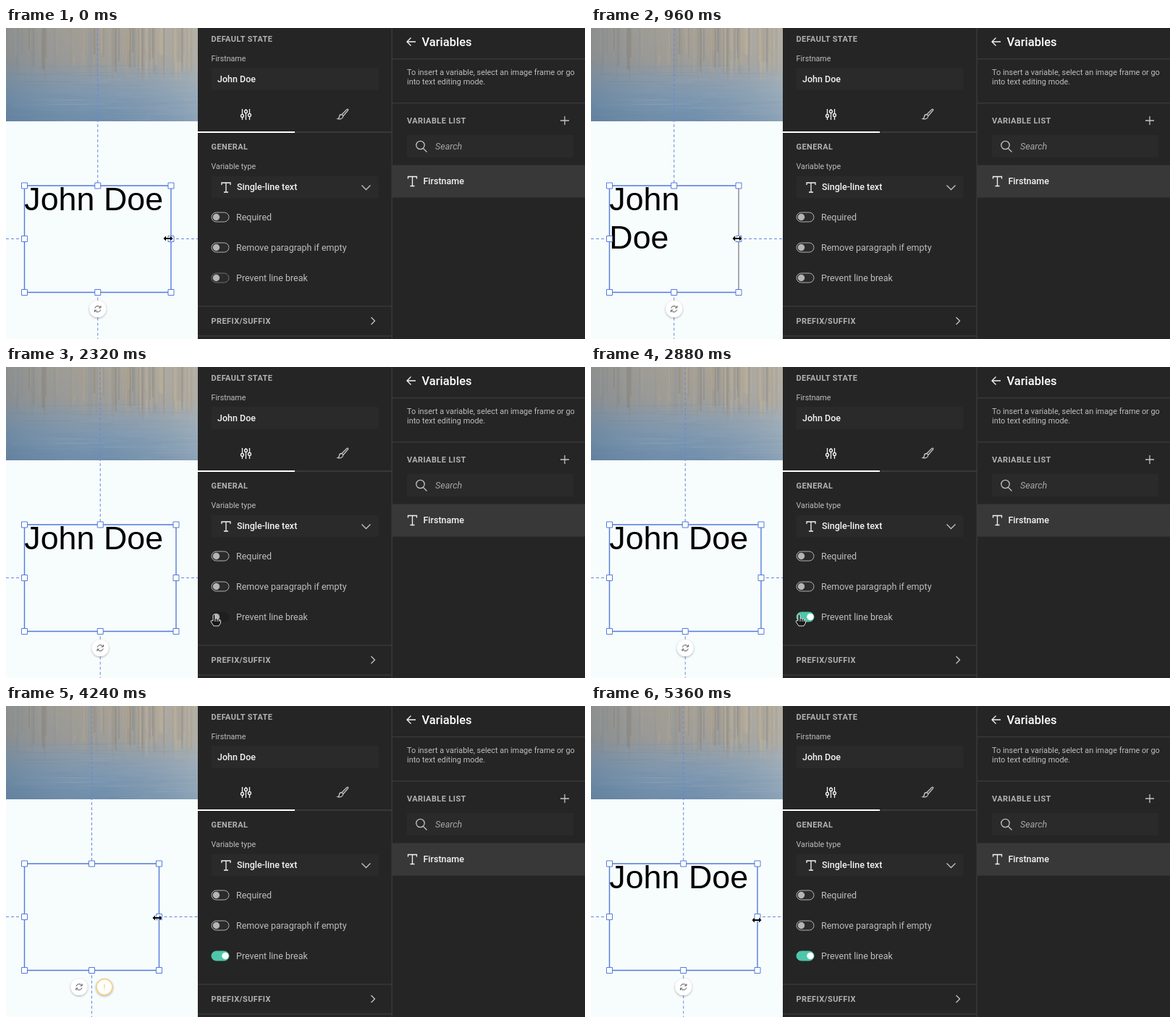
Animation, 800 px wide and 430 px high, one loop 5440 ms. Source, as an HTML page:

```html
<!DOCTYPE html>
<html lang="en">
<head>
<meta charset="utf-8">
<style>
  html, body { margin: 0; width: 100%; height: 100%; overflow: hidden; background: #f7fdfd; }
  svg { display: block; }
  text { font: 400 12.5px Roboto, sans-serif; fill: #bdbdbd; white-space: pre; }
  .head { font-weight: 700; font-size: 11px; letter-spacing: .4px; fill: #b2b2b2; }
  .label { font-size: 10.7px; }
  .note { font-size: 10.9px; }
  .search { font-style: italic; fill: #a6a6a6; }
  .value { font-weight: 500; fill: #f4f4f4; }
  .title { font-weight: 500; font-size: 16.5px; fill: #fff; }
  .doc { font: 44.8px "Liberation Sans", Arial, sans-serif; fill: #000; }
  .icon { fill: none; stroke: #c4c4c4; stroke-width: 1.3; }
  .white { stroke: #f4f4f4; }
  .guide { fill: none; stroke: #6a87da; stroke-dasharray: 4 3; }
  .field { fill: #2a2a2a; }
  .rule { fill: #383838; }
</style>
</head>
<body>
<svg width="800" height="430" viewBox="0 0 800 430">
  <defs>
    <linearGradient id="water" x2="0" y2="1">
      <stop offset="0" stop-color="#a8a195"/>
      <stop offset=".35" stop-color="#a09d97"/>
      <stop offset=".55" stop-color="#8c9cab"/>
      <stop offset=".75" stop-color="#7b97b1"/>
      <stop offset="1" stop-color="#6c8cac"/>
    </linearGradient>
    <linearGradient id="light">
      <stop offset="0" stop-color="#4d6880" stop-opacity=".3"/>
      <stop offset=".5" stop-color="#8e9aa5" stop-opacity=".08"/>
      <stop offset="1" stop-color="#d3d3cc" stop-opacity=".32"/>
    </linearGradient>
    <linearGradient id="fade" x2="0" y2="1">
      <stop offset="0" stop-color="#fff"/>
      <stop offset=".65" stop-color="#fff"/>
      <stop offset="1" stop-color="#000"/>
    </linearGradient>
    <mask id="melt"><rect width="265" height="78" fill="url(#fade)"/></mask>
    <filter id="shadow" x="-50%" y="-50%" width="200%" height="200%">
      <feDropShadow dx="0" dy="1" stdDeviation="1.5" flood-opacity=".35"/>
    </filter>
    <g id="toggle">
      <rect x="284" y="-6.5" width="24" height="13" rx="6.5" fill="#2b2b2b" stroke="#b0b0b0"/>
      <circle cx="290.5" r="4.7" fill="#b4b4b4"/>
    </g>
    <path id="tee" class="icon white" d="M-6-3.5V-6.5H6V-3.5M0-6.5V6.5M-3 6.5H3"/>
  </defs>

  <rect width="265" height="129" fill="url(#water)"/>
  <g id="streaks" mask="url(#melt)"></g>
  <g id="ripples"></g>
  <rect width="265" height="129" fill="url(#light)"/>

  <path id="guides" class="guide"/>
  <text id="line1" class="doc" x="25.3" y="251.7"></text>
  <text id="line2" class="doc" x="25.3" y="305.2"></text>
  <path id="frame" fill="none" stroke="#527add" stroke-width="1.4"/>
  <path id="edge" fill="none" stroke-width="1.4"/>
  <path id="handles" fill="#fff" stroke="#527add"/>
  <g id="refresh">
    <circle r="11.5" fill="#fff" filter="url(#shadow)"/>
    <path d="M-4-1A4.2 4.2 0 0 1 3.5-2.4M4.2-4.5V-1.6H1.4M4 1A4.2 4.2 0 0 1-3.5 2.4M-4.2 4.5V1.6H-1.4" fill="none" stroke="#555"/>
  </g>
  <g id="warning">
    <circle r="11" fill="#fff" stroke="#f3cd80" stroke-width="1.4" filter="url(#shadow)"/>
    <path d="M0-4V1.5M0 3V4.2" stroke="#f3cd80" stroke-width="1.2"/>
  </g>

  <rect x="265" width="535" height="430" fill="#252525"/>
  <rect class="rule" x="532.5" width="1.5" height="430"/>
  <rect class="rule" x="265" y="143" width="268" height="2"/>
  <rect x="265" y="143" width="134" height="2" fill="#fff"/>
  <rect class="rule" x="265" y="384" width="268" height="1.5"/>
  <rect class="rule" x="265" y="425" width="268" height="1.5"/>
  <rect class="rule" x="534" y="42" width="266" height="1.5"/>
  <rect class="rule" x="534" y="103" width="266" height="1.5"/>

  <text class="head" x="283.5" y="19">DEFAULT STATE</text>
  <text class="label" x="283.5" y="46">Firstname</text>
  <rect class="field" x="283.5" y="55" width="231" height="31" rx="2"/>
  <text class="value" x="292" y="75">John Doe</text>
  <g class="icon white">
    <path d="M326.5 112V119M326.5 124V127M331.5 112V113M331.5 118V127M336.5 112V118M336.5 123V127"/>
    <circle cx="326.5" cy="121.5" r="2"/>
    <circle cx="331.5" cy="115.5" r="2"/>
    <circle cx="336.5" cy="120.5" r="2"/>
  </g>
  <path class="icon" d="M464 119.5L471 112.5Q473.5 111.5 472.5 114L466 121.5ZM464 119.5Q460.5 119.5 460.5 123Q460 125 458.5 125.5Q465 127 466 121.5"/>

  <text class="head" x="283.5" y="168">GENERAL</text>
  <text class="label" x="283.5" y="195">Variable type</text>
  <rect class="field" x="283.5" y="205" width="231" height="30" rx="2"/>
  <use href="#tee" x="304" y="220.5"/>
  <text class="value" x="319" y="224">Single-line text</text>
  <path class="icon" d="M491.5 217.5L497.5 223.5L503.5 217.5"/>
  <use href="#toggle" y="261.5"/>
  <text x="318" y="266">Required</text>
  <use href="#toggle" y="303.5"/>
  <text x="318" y="308">Remove paragraph if empty</text>
  <rect id="track" x="284" y="339" width="24" height="13" rx="6.5"/>
  <circle id="knob" cy="345.5" r="4.7"/>
  <text x="318" y="350">Prevent line break</text>
  <text class="head" x="283.5" y="409">PREFIX/SUFFIX</text>
  <path class="icon" d="M504.5 400L509.5 405L504.5 410"/>

  <path class="icon white" d="M566 19H554M559.5 13.5L554 19L559.5 24.5"/>
  <text class="title" x="574.5" y="25">Variables</text>
  <text class="note" x="554" y="65">To insert a variable, select an image frame or go</text>
  <text class="note" x="554" y="78">into text editing mode.</text>
  <text class="head" x="554" y="132">VARIABLE LIST</text>
  <path class="icon" d="M766 128H778M772 122V134"/>
  <rect class="field" x="554" y="148" width="230" height="31" rx="2"/>
  <path class="icon" d="M576.5 166.5L581.5 171.5"/>
  <circle class="icon" cx="572.5" cy="162" r="5.7"/>
  <text class="search" x="593" y="168">Search</text>
  <rect x="534" y="189.5" width="266" height="45" fill="#383838"/>
  <use href="#tee" x="561.5" y="212"/>
  <text class="value" x="576.5" y="216">Firstname</text>

  <path id="cursor"/>
</svg>
<script>
const $ = id => document.getElementById(id);
const set = (id, attrs) => {
  for (const k in attrs) $(id).setAttribute(k, attrs[k]);
};

// Reflection: vertical streaks above, fine ripples below
let seed = 7;
const rnd = () => (seed = seed * 16807 % 2147483647) / 2147483647;
const tones = ['#c0a780', '#77797a', '#b8ab96', '#8d9499', '#c8b28f', '#8f8473'];
let svg = '';
for (let i = 0; i < 110; i++) {
  svg += `<rect x="${rnd() * 264}" width="${1 + rnd() * 3}" height="${30 + rnd() * 48}"
    fill="${tones[i % 6]}" opacity="${.15 + rnd() * .35}"/>`;
}
$('streaks').innerHTML = svg;
svg = '';
for (let i = 0; i < 80; i++) {
  const x = rnd() * 240, y = 50 + rnd() * 78;
  svg += `<rect x="${x}" y="${y}" width="${Math.min(265 - x, 20 + rnd() * 80)}" height="1"
    fill="${i % 2 ? '#a9b9cb' : '#5f7f9f'}" opacity=".14"/>`;
}
$('ripples').innerHTML = svg;

// time, right edge of the text frame, cursor x, cursor y
const keys = [
  [0, 228, 224, 291], [640, 216, 213, 291], [960, 204, 202, 291], [1120, 199, 197, 292],
  [1440, 229, 227, 293], [1760, 235, 233, 293], [1920, 235, 233, 293], [2240, 235, 289, 349],
  [2880, 235, 289, 349], [3120, 235, 232, 294], [3440, 220, 217, 294], [3760, 200, 198, 293],
  [4000, 200, 198, 293], [4240, 211.5, 209, 293], [4800, 226, 224, 294], [5360, 230, 229, 296],
  [5440, 228, 224, 291]
];
const LOOP = 5440, STEP = 80;
function pose(t) {
  const i = keys.findIndex(k => k[0] > t), a = keys[i - 1], b = keys[i];
  const f = (t - a[0]) / (b[0] - a[0]);
  return a.map((v, j) => v + (b[j] - v) * f).slice(1);
}

const cursors = {
  resize: ['M-6.5 0L-3-3.5V-1H3V-3.5L6.5 0L3 3.5V1H-3V3.5Z', '#000', '#fff'],
  arrow: ['M0 0V14L3.5 11L6 16L8 15L5.8 10.2H10Z', '#000', '#fff'],
  hand: ['M-3-6Q-1.5-8 0-6V-1Q2-2.5 3-.5Q5-1.5 5.5 .5Q7.5 0 7.5 2V5L5 9H-2L-6 3Q-6 .5-3 2ZM0-1V3M3-.5V3M5.500 .5V3', '#181818', '#ddd']
};
const left = 25.5, upper = 218, lower = 365.5, middle = 291.5;

function draw(now) {
  const t = Math.floor(now % LOOP / STEP) * STEP;
  const [right, x, y] = pose(t);
  const mid = (left + right) / 2;
  const nowrap = t >= 2480, fits = right >= 218;
  const hidden = nowrap && !fits;
  const narrowing = right - pose((t + LOOP - STEP) % LOOP)[0] < -2.5;

  $('line1').textContent = hidden ? '' : fits ? 'John Doe' : 'John';
  $('line2').textContent = hidden || fits ? '' : 'Doe';
  set('guides', { d: `M${mid} 0V${upper}M${mid} ${lower}V430M0 ${middle}H${left}M${right} ${middle}H265` });
  set('frame', { d: `M${right} ${upper}H${left}V${lower}H${right}` });
  set('edge', { d: `M${right} ${upper}V${lower}`, stroke: narrowing ? '#85858f' : '#527add' });
  const spots = [left, mid, right].flatMap(hx => [upper, middle, lower].map(hy => [hx, hy]))
    .filter(([hx, hy]) => hx !== mid || hy !== middle);
  set('handles', { d: spots.map(([hx, hy]) => `M${hx - 4} ${hy - 4}h8v8h-8z`).join('') });
  set('refresh', { transform: `translate(${mid - (hidden ? 17.5 : 0)} 388.5)` });
  set('warning', { transform: `translate(${mid + 17.5} 388.5)`, visibility: hidden ? 'visible' : 'hidden' });

  const kind = x > 281 ? 'hand' : Math.abs(x - right) < 5 ? 'resize' : 'arrow';
  const hover = kind === 'hand';
  set('track', {
    fill: nowrap ? '#4fc6aa' : hover ? '#1f1f1f' : '#2b2b2b',
    stroke: nowrap ? '#4fc6aa' : hover ? '#1f1f1f' : t < STEP ? '#707070' : '#b0b0b0'
  });
  set('knob', { cx: nowrap ? 303 : 290.5, fill: nowrap ? '#fff' : '#b4b4b4' });
  const [d, fill, stroke] = cursors[kind];
  set('cursor', { d, fill, stroke, 'paint-order': hover ? 'fill' : 'stroke', transform: `translate(${x} ${y})` });
  requestAnimationFrame(draw);
}
draw(0);
</script>
</body>
</html>
```
